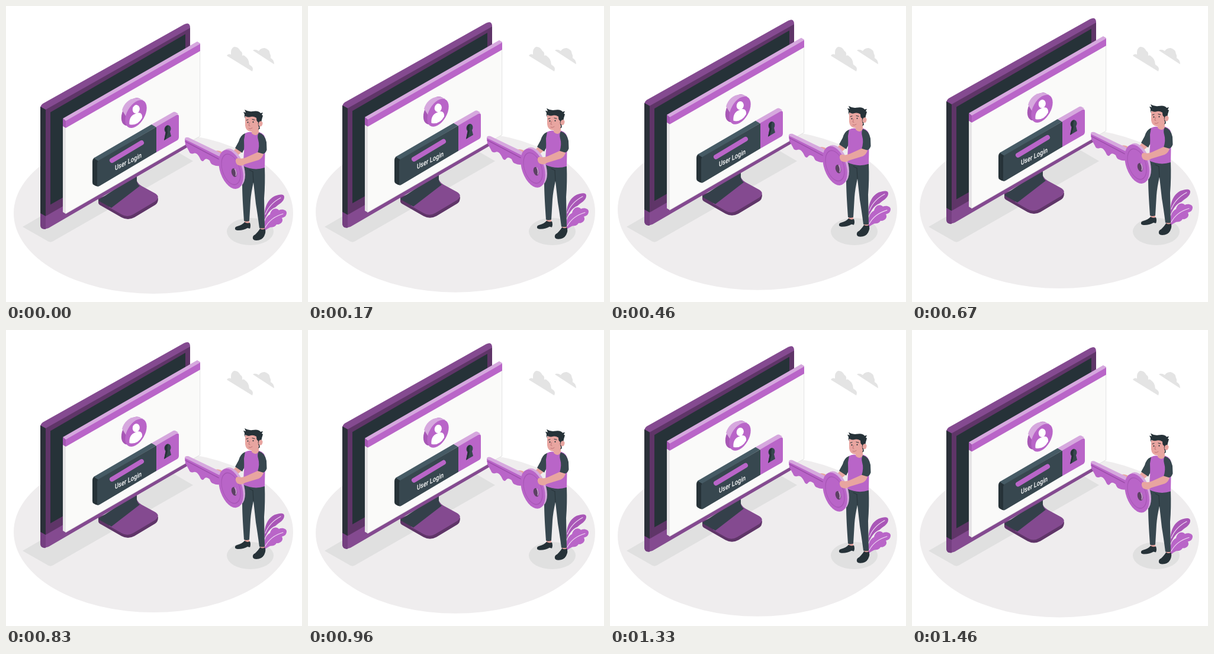
An HTML page that plays this animation: 500x500 px, repeating every 1500 ms.

```html
<!DOCTYPE html>
<html lang="en">
<head>
<meta charset="utf-8">
<title>User Login</title>
<style>
  html, body { margin: 0; width: 100%; height: 100%; overflow: hidden; background: #fff; }
  svg { display: block; width: 100vw; height: 100vh; }
  .p { fill: #b965c8; }
  .light { fill: #d6a8de; }
  .plum { fill: #844a90; }
  .deep { fill: #5f3568; }
  .ink { fill: #263238; }
  .slate { fill: #37474f; }
  .skin { fill: #e8a5a0; }
  .shade { fill: #e0e0e0; }
  .cloud { fill: #e4e4e4; }
  .line { fill: none; stroke-linecap: round; stroke-linejoin: round; }
  text { font: 500 12.2px Roboto, Inter, sans-serif; fill: #fff; }
</style>
</head>
<body>
<svg viewBox="0 0 500 500" xmlns="http://www.w3.org/2000/svg">
  <g class="lift">
    <ellipse cx="249" cy="350" rx="236" ry="136" fill="#efedee"/>
  </g>

  <g id="shadows">
    <path class="shade" d="M28 373 L72 398 Q76 400 80 397 L316 262 L268 234 Z"/>
    <ellipse class="shade" cx="412.5" cy="381" rx="39.5" ry="23"/>
  </g>

  <g id="clouds">
    <path class="cloud" d="M373 84 Q375 80 380 82 Q379 72 385 69 Q392 68 396 76 Q400 78 399 84 Q402 82 405 86 Q410 89 411 99 Q417 102 417 107 L416 110.500 Z"/>
    <path class="cloud" d="M417 75 Q421 72 427 76 Q430 71 437 71 Q445 73 446 81 Q448 84 447 88 Q453 91 453 98.500 Z"/>
  </g>

  <g class="lift">
    <g id="stand">
      <path class="deep" d="M156 325 V332 Q156 335 160 337 L195 357 Q206 363 217 357 L252 336 Q257 333 257 325 L222 300 Z"/>
      <path class="plum" d="M220 288 Q219 298 229 304 L251 316 Q262 322 252 330 L215 352 Q205 358 195 352 L174 340 L190 310 Z"/>
      <path fill="#34404a" d="M156 328 L186 308 L221 286 V296 Q222 301 226 304 L178 341 L160 331 Q156 329 156 328 Z"/>
    </g>

    <g id="monitor">
      <path class="plum" d="M58 173 Q58 168 62 165 L301 31 Q311 26 311 37 V236 L72 375 Q58 380 58 369 Z"/>
      <path fill="#2b3039" d="M58 170 L67 175 V356 L58 351 Z"/>
      <path class="deep" d="M67 175 L311 37 V215 L67 355 Z"/>
      <path class="ink" d="M75 179.500 L303 47.500 V206 L75 335.500 Z"/>
      <path fill="#743f80" d="M58 350 L67 355 V377 Q58 378 58 369 Z"/>
    </g>

    <g id="panel" transform="translate(0 -1)">
      <path fill="#e6e4e6" d="M96 203 L101 206 V352 L96 349 Z"/>
      <path fill="#fafaf9" d="M101 204 L328 74 V221 L101 352 Z"/>
      <path class="line" stroke="#dcdcdc" stroke-width=".8" d="M327.7 77 V221 L101 351.6"/>
      <path class="light" d="M96 191 L323 61 L328 64 V67 L101 196 Z"/>
      <path class="p" d="M101 195 L328 65 V77 L101 207 Z"/>
      <path fill="#a557b3" d="M96 191 L101 195 V207 L96 204 Z"/>
    </g>

    <g id="avatar">
      <g transform="matrix(.866 -.5 0 1 213 178.800)"><circle r="21" fill="#a757b5"/></g>
      <path class="light" d="M196 176 C199 164 210 154 224 156 L232 159 L203 187 Z"/>
      <g transform="matrix(.866 -.5 0 1 219.500 182.500)"><circle class="p" r="21"/></g>
      <ellipse cx="219.800" cy="174.300" rx="6" ry="7.2" fill="#fff" transform="rotate(12 219.800 174.300)"/>
      <path fill="#fff" d="M208.500 200 C207.500 190 212 184 218.500 182 C225 178 231 181 230 189 Q222 203 208.500 200 Z"/>
    </g>

    <g id="login">
      <path class="ink" d="M146 263 Q146 258 150 256 L160 258 L156 305 Q152 305 148 302 Q146 301 146 298 Z"/>
      <path fill="#465b65" d="M148 257 L246 200 L254 204 L156 262 Z"/>
      <path class="slate" d="M154 266 Q154 262 158 260 L254 204 V247 L158 304 Q154 306 154 302 Z"/>
      <path class="light" d="M246 200 L281 180 Q284 178 286 179 L291 182 L254 205 Z"/>
      <path class="p" d="M254 204 L288 184 Q292 182 292 187 V221 Q292 225 289 227 L254 247 Z"/>
      <path class="line" stroke="#b965c8" stroke-width="8" d="M179 261 L229 231"/>
      <text transform="matrix(.77 -.38 0 1 184 278)">User Login</text>
      <ellipse class="slate" cx="273" cy="208" rx="5.4" ry="6.8" transform="rotate(14 273 208)"/>
      <path class="slate" d="M270 211 L276 208 L279 220 L267 227 Z"/>
      <path class="ink" d="M268 208 Q269 202 274 202 Q271 209 273 213 L270 225 L267 227 L270 213 Z"/>
    </g>

    <g id="plant">
      <path fill="#a957b7" d="M437 361 C435 343 441 327 454 321 C462 318 470 317 470 323 C470 331 460 335 455 340 C447 343 442 350 437 361 Z"/>
      <path class="p" d="M436 381 C434 366 439 355 446 352 C448 342 457 340 461 345 C467 342 474 345 474 349 C474 355 470 357 466 358 C470 365 462 370 457 369 C453 375 448 373 446 374 Q441 376 436 381 Z"/>
      <path class="line" stroke="#f0dcf3" stroke-width="1.1" d="M438 352 Q445 334 464 324 M438 374 Q447 357 468 351"/>
    </g>

    <g id="man">
      <path class="skin" d="M390 239 L399 246 L386 257 L378 251 Z"/>
      <path class="skin" d="M351 247 Q355 242 364 246 L366 253 H358 Z"/>

      <path class="skin" d="M403 358 H411 V369 H403 Z M429 370 H437 V380 H429 Z"/>
      <path class="ink" d="M387 377 Q386 373 391 372 Q399 370 403 365 Q407 368 412 366 Q414 371 412 376 L408 375 Q401 379 393 379 Q388 379 387 377 Z"/>
      <path class="ink" d="M417 393 Q416 388 421 386 Q427 380 429 376 Q434 379 437 376 Q440 381 436 389 Q432 396 423 396 Q418 396 417 393 Z"/>
      <path class="slate" d="M400 268 L437 272 Q438 300 436 325 L437 375 Q433 376 428 375 Q425 352 422 334 L418 298 Q414 315 413 329 L411 363 Q406 365 402 363 C400 335 399 315 399 300 Z"/>
      <path class="line" stroke="#263238" stroke-width="1" d="M418 298 L417 280 M417 280 L411 277"/>

      <path class="slate" d="M404 215 Q396 218 393 229 L387 240 L399 248 L406 235 Z"/>
      <path class="p" d="M404 215 Q412 211 417 214 L428 213 Q437 216 438 225 L437 273 Q419 279 400 270 Q403 245 402 226 Z"/>
      <path class="skin" d="M414 202 L427 200 L427 214 Q422 222 415 215 Z"/>
      <path class="slate" d="M427 214 Q437 216 440 230 L440.500 243 Q438 250 433 250 L425 248 Q429 236 426 226 Q424 219 427 214 Z"/>

      <g id="head">
        <path class="skin" d="M404 187 L427 184 L429 201 Q424 213 413 212 Q405 211 404 202 Z"/>
        <path class="ink" d="M404 190 Q402 186 403 183 L401 179 L405 180 L403 175 Q409 179 416 178 Q427 176 430 181 L434 180 L432 184 L434 185 Q432 191 431 197 L428 205 Q425 203 426 196 Q423 196 423 189 Q418 186 414 187 Q409 189 404 186 Z"/>
        <ellipse class="skin" cx="430" cy="199" rx="3.400" ry="4.500" transform="rotate(15 430 199)"/>
        <path class="ink" d="M428 203 L429 207 L426 209 Z"/>
        <ellipse class="ink" cx="408.500" cy="196.500" rx=".9" ry="1.200"/>
        <ellipse class="ink" cx="417.500" cy="196" rx=".9" ry="1.200"/>
        <path class="line" stroke="#263238" stroke-width="1" d="M406 193 L409 192 M416 191.500 L420 192.500"/>
        <path class="line" stroke="#b96e72" stroke-width=".9" d="M411.500 197 L410 202 L412 202.500 M410 207 Q413 208.500 416 206"/>
      </g>
    </g>

    <g id="key">
      <path class="p" d="M302 225 L362 250 V269 Q358 272 349 268 Q346 267 344 261 Q338 256 335 260 Q331 266 327 256 Q322 247 317 249 Q311 251 309 245 L303 234 Z"/>
      <path class="light" d="M302 225 Q302 221 308 222 L362 248 V255 Z"/>
      <path class="line" stroke="#9d4eab" stroke-width="1.500" d="M303 229 L360 259"/>
      <g transform="matrix(.866 .5 0 1 383.500 273.500)"><ellipse class="light" rx="23.600" ry="30.500"/></g>
      <g transform="matrix(.866 .5 0 1 380 276)">
        <ellipse class="p" rx="24" ry="30.800"/>
        <ellipse class="line" stroke="#a655b4" stroke-width="1.200" rx="18.500" ry="24"/>
      </g>
      <ellipse fill="#5c4164" cx="385.500" cy="281.500" rx="4.500" ry="7.400" transform="rotate(-16 385.500 281.500)"/>
      <path class="light" d="M387 275 Q391 280 389 287 L387.500 287 Q389 280 385.500 275 Z"/>
    </g>

    <path id="arm" class="skin" d="M425 247 L435 250 Q433 257 427 260 L404 267 Q399 271 393 269 Q389 268 388 263 Q387 257 392 257 Q398 259 405 256 Z"/>
  </g>
</svg>
<script>
  const LOOP = 1500, RISE = 10;
  const parts = document.querySelectorAll('.lift');

  // Steady rise for half the loop, then a steady fall.
  function draw(ms) {
    const u = (ms % LOOP) / LOOP;
    const y = -RISE * (1 - Math.abs(1 - 2 * u));
    for (const el of parts) el.setAttribute('transform', `translate(0 ${y.toFixed(3)})`);
  }

  const start = performance.now();
  function tick() {
    draw(performance.now() - start);
    requestAnimationFrame(tick);
  }
  tick();
</script>
</body>
</html>
```
